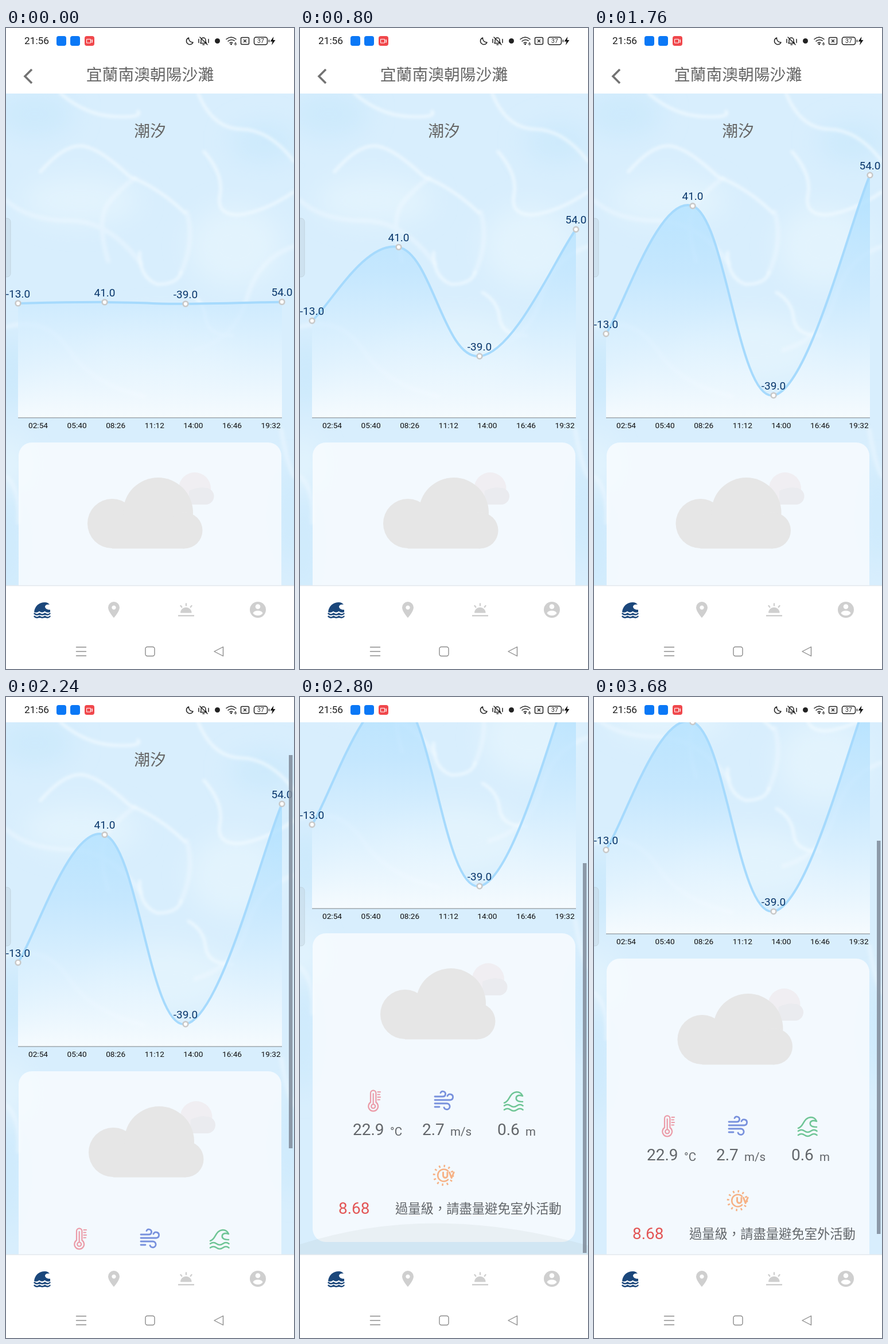
These frames come from a looping animation (502 by 1115 pixels, 3.76 s). An HTML page:

```html
<!DOCTYPE html>
<html lang="zh-Hant">
<head>
<meta charset="utf-8">
<title>潮汐</title>
<style>
html, body { margin: 0; width: 100%; height: 100%; overflow: hidden; background: #fff; }
svg { display: block; width: 100%; height: 100%; }
text { font-family: Roboto, "Noto Sans CJK TC", "Noto Sans CJK JP", "Noto Sans CJK", sans-serif; }
.mid { text-anchor: middle; }
.line { fill: none; stroke-linecap: round; stroke-linejoin: round; }
</style>
</head>
<body>
<svg viewBox="0 0 502 1115" preserveAspectRatio="none">
  <defs>
    <linearGradient id="fill" gradientUnits="userSpaceOnUse" x1="0" y1="215" x2="0" y2="678">
      <stop offset="0" stop-color="#a6deff" stop-opacity=".85"/>
      <stop offset=".45" stop-color="#bde4ff" stop-opacity=".7"/>
      <stop offset="1" stop-color="#fff" stop-opacity=".75"/>
    </linearGradient>
    <filter id="soft" x="-20%" y="-20%" width="140%" height="140%"><feGaussianBlur stdDeviation="2.5"/></filter>
    <filter id="haze" x="-50%" y="-50%" width="200%" height="200%"><feGaussianBlur stdDeviation="22"/></filter>
  </defs>

  <g id="page">
    <rect y="44" width="502" height="1300" fill="#d8eefd"/>
    <g filter="url(#haze)">
      <g fill="#c9e8fc" opacity=".7">
        <ellipse cx="50" cy="150" rx="70" ry="40"/><ellipse cx="10" cy="600" rx="50" ry="60"/>
        <ellipse cx="450" cy="200" rx="60" ry="35"/><ellipse cx="495" cy="850" rx="25" ry="90"/>
        <ellipse cx="5" cy="900" rx="25" ry="100"/>
      </g>
      <g fill="#eaf7fe" opacity=".6">
        <ellipse cx="130" cy="300" rx="100" ry="40"/><ellipse cx="400" cy="380" rx="80" ry="70"/>
        <ellipse cx="270" cy="560" rx="130" ry="60"/><ellipse cx="5" cy="760" rx="30" ry="50"/>
      </g>
    </g>
    <g class="line" stroke="#f3fbff" filter="url(#soft)">
      <g stroke-width="5" opacity=".75">
        <path d="M95 114Q140 152 190 154T230 145M60 250Q100 204 130 205T215 258Q270 280 312 322"/>
        <path d="M335 114Q360 175 410 176T502 232M345 215Q380 255 373 290T405 325Q450 320 502 285"/>
        <path d="M233 390Q232 435 265 446Q300 445 305 425M318 460Q345 475 348 505T395 535"/>
      </g>
      <g stroke-width="8" opacity=".4">
        <path d="M0 300Q40 335 110 335T235 410M178 405Q155 330 182 300T225 262M305 425Q330 370 315 320"/>
        <path d="M502 380Q440 400 420 470T330 560M0 520Q70 500 110 560T240 640M0 780Q25 800 22 860M480 700Q490 760 502 780"/>
      </g>
    </g>

    <rect y="44" width="502" height="70" fill="#fff"/>
    <path class="line" d="M45 72L33 84L45 96" stroke="#737373" stroke-width="3.6" style="stroke-linecap:butt;stroke-linejoin:miter"/>
    <g class="mid" font-size="27.8" fill="#666">
      <text x="251" y="91">宜蘭南澳朝陽沙灘</text>
      <text x="251" y="189">潮汐</text>
    </g>

    <path id="area" fill="url(#fill)"/>
    <path d="M21 678H481" stroke="#7c8286" stroke-width="1.2"/>
    <path id="curve" class="line" stroke="#a6dafd" stroke-width="4"/>
    <g id="points" class="mid" font-size="19" fill="#08366b"></g>
    <g id="hours" class="mid" font-size="13.7" fill="#111"></g>

    <rect x="22" y="721" width="458" height="537" rx="23" fill="#fbfdff" fill-opacity=".8"/>
    <g id="smallCloud">
      <circle cx="328" cy="801" r="28" fill="#f0eef2"/>
      <path d="M318 829V805Q336 797 347 800A14.5 14.5 0 0 1 347 829Z" fill="#eaebef"/>
    </g>
    <g id="bigCloud" fill="#e6e6e6">
      <circle cx="185" cy="862" r="43"/><circle cx="265" cy="843" r="61"/><circle cx="311" cy="874" r="31.5"/>
      <rect x="185" y="850" width="126" height="55.5"/>
    </g>

    <g class="line" stroke="#eb9ba8" stroke-width="2.2">
      <path d="M123 1015V999a4.7 4.7 0 0 1 9.4 0V1015a8.4 8.4 0 1 1-9.4 0ZM127.7 1000V1018M135.500 997H140M135.500 1001.500H139M135.500 1006H140M135.500 1010.500H139"/>
      <circle cx="127.700" cy="1022" r="3.500"/>
    </g>
    <path class="line" stroke="#7891dd" stroke-width="2.8" d="M235 1005H249A4.500 4.500 0 1 0 245 998.500M235 1011H262A5 5 0 1 0 257 1004M235 1017H256A5.200 5.200 0 1 1 251 1024M235 1023H243"/>
    <path class="line" stroke="#6fc596" stroke-width="2.6" d="M356 1016C366 1014 364 998 378 997Q385 997 388 1004Q380 1001 377 1006Q375 1014 388 1014M356 1021q5.500-4 11 0t11 0t10.500 0M356 1028q5.500-4 11 0t11 0t10.500 0"/>
    <g fill="none" stroke="#f6b286">
      <circle cx="250" cy="1142" r="16.300" stroke-width="4" stroke-dasharray="2.6 5.930"/>
      <path d="M258 1134.500A10.500 10.500 0 1 0 258 1149.500" stroke-width="2.600" stroke-linecap="round"/>
      <path class="line" d="M249.500 1137v5.500a3.700 3.700 0 0 0 7.400 0v-5.500M260.500 1137l3.600 9.500l4-9.500" stroke-width="3"/>
    </g>
    <g font-size="28" fill="#62666a">
      <text x="92" y="1072">22.9</text><text x="213" y="1072">2.7</text><text x="344" y="1072">0.6</text>
      <text x="67" y="1209" fill="#e35656">8.68</text>
      <g font-size="20.500">
        <text x="157" y="1073">°C</text><text x="262" y="1073">m/s</text><text x="393" y="1073">m</text>
      </g>
      <text x="166" y="1207.500" font-size="22.300">過量級，請盡量避免室外活動</text>
    </g>
  </g>

  <path id="glow" d="M0 952Q230 878 502 954V970H0Z" fill="#8a8f94" fill-opacity=".09"/>
  <rect id="bar" x="493" width="6.500" fill="#818d9b" fill-opacity=".87"/>
  <rect x="-10" y="331" width="18" height="102" rx="6" fill="#c6d8e3" fill-opacity=".5" stroke="#b9c9d3" stroke-opacity=".6"/>

  <!-- status bar -->
  <rect width="502" height="44" fill="#fff"/>
  <text x="32" y="28.300" font-size="17.300" fill="#1c1c1c">21:56</text>
  <rect x="88" y="14" width="17" height="17" rx="4" fill="#0b78f6"/>
  <rect x="112" y="14" width="17" height="17" rx="4" fill="#0b78f6"/>
  <rect x="137" y="14" width="17" height="17" rx="4" fill="#f0484c"/>
  <path class="line" d="M141 19.500h6.500v6.500H141ZM147.500 22l3-1.500v4.500l-3-1.500" stroke="#fff" stroke-width="1"/>
  <g class="line" stroke="#222" stroke-width="1.500">
    <path d="M318.500 17A6 6 0 1 0 326 25A7 7 0 0 1 318.500 17Z"/>
    <path d="M339 26.500H349.500L348 24V21a4 4 0 0 0-8 0v3ZM343 29h2.500M338 16L351 29M336 19.500v6M353 19.500v6"/>
    <path d="M384 19.500Q392.500 12.500 401 19.500M387 23Q392.500 18.500 398 22M390 26Q392.500 24 395 26"/>
    <rect x="409.500" y="16.500" width="14" height="12" rx="2"/>
    <path d="M414.500 20.500l4 4m0-4l-4 4"/>
    <rect x="432.500" y="16" width="23" height="13" rx="3.500"/>
    <path d="M458.500 21v3"/>
  </g>
  <circle cx="368.500" cy="22.500" r="4.500" fill="#222"/>
  <circle cx="392.500" cy="28" r="1.500" fill="#222"/>
  <text x="398" y="30" font-size="7" font-weight="700" fill="#222">6</text>
  <text class="mid" x="444" y="26.300" font-size="10.500" fill="#222">37</text>
  <path d="M466.500 15L460.500 23.500H464.500L463 30L469.500 21H465.500Z" fill="#111"/>

  <!-- bottom navigation -->
  <rect y="970" width="502" height="145" fill="#fff"/>
  <path d="M0 970H502" stroke="#e3e9ee" stroke-width="1.500"/>
  <g fill="#1b477b">
    <path d="M49 1016C50 1006 57 999 68 999Q73 999 76 1003C71 1002 68 1004 68 1007Q69 1012 77 1012V1016Q72 1018 67.500 1014.500Q63 1018.500 58 1014.500Q54 1018 49 1016Z"/>
    <path class="line" d="M49.500 1018.500q4.500 4 9 0q4.700 4 9.300 0q4.700 4 8.800 0M49.500 1023.500q4.500 4 9 0q4.700 4 9.300 0q4.700 4 8.800 0" stroke="#1b477b" stroke-width="2.400" style="fill:none"/>
  </g>
  <g fill="#cfcfcf">
    <path fill-rule="evenodd" d="M188 998a10 10 0 0 1 10 10C198 1015 188 1026 188 1026S178 1015 178 1008A10 10 0 0 1 188 998ZM188 1004.500a3.600 3.600 0 1 0 .010 0Z"/>
    <path d="M304 1017.500a9.800 9.800 0 0 1 19.600 0ZM300 1021h28v2.600h-28Z"/>
    <path class="line" d="M314 1001.500v3M304.500 1005l1.800 2.200M323.500 1005l-1.800 2.200" stroke="#cfcfcf" stroke-width="2.400"/>
    <circle cx="439" cy="1012" r="14"/>
    <circle cx="439" cy="1006.500" r="4.300" fill="#fff"/>
    <path d="M430.500 1018Q432 1013.500 439 1013.500T447.500 1018Q444.500 1022 439 1022T430.500 1018Z" fill="#fff"/>
  </g>
  <g class="line" stroke="#8c8c8c" stroke-width="1.400">
    <path d="M122.500 1077H139.500M122.500 1084.500H139.500M122.500 1092H139.500"/>
    <rect x="243" y="1076.500" width="16" height="16" rx="3.500"/>
    <path d="M378.500 1076.500V1092.500L363 1084.500Z"/>
  </g>
</svg>
<script>
const LOOP = 3760, STEP = 80;
const tides = [[21, -13], [172, 41], [313, -39], [481, 54]];
const hours = ['02:54', '05:40', '08:26', '11:12', '14:00', '16:46', '19:32'];

// Keyframes: [time, value], or [scroll, value] for the bar
const scrollKeys = [[1920, 0], [2080, 22], [2240, 70], [2400, 202], [2480, 252], [2560, 286], [2640, 303], [2720, 310], [3600, 310], [3680, 266]];
const bigKeys = [[0, 142], [240, 141], [720, 145.4], [800, 145], [1360, 140.3], [1680, 142.5], [1920, 142.5], [2080, 145], [2240, 144], [2400, 142.5], [2800, 140], [3360, 143.5], [3680, 145.5]];
const smallKeys = [[0, 363], [320, 362], [800, 365.5], [1200, 364], [1680, 367], [1920, 367], [2240, 365.5], [2400, 364], [2800, 362], [3280, 363], [3680, 365.5]];
const barFadeKeys = [[1920, 0], [2080, 1], [3120, 1], [3360, 0], [3600, 0], [3680, 1]];
const glowKeys = [[2560, 0], [2720, 1], [2800, 1], [3200, 0]];
const barTopKeys = [[0, 48], [70, 101], [202, 201], [266, 250], [310, 289]];

const $ = id => document.getElementById(id);
const set = (node, attrs) => { for (const k in attrs) node.setAttribute(k, attrs[k]); };

function make(parent, tag, attrs, text = '') {
  const node = document.createElementNS('http://www.w3.org/2000/svg', tag);
  set(node, attrs);
  node.textContent = text;
  return parent.appendChild(node);
}

function at(keys, t) {
  const i = keys.findIndex(k => k[0] > t);
  if (i < 0) return keys[keys.length - 1][1];
  if (i === 0) return keys[0][1];
  const [t0, a] = keys[i - 1], [t1, b] = keys[i];
  return a + (b - a) * (t - t0) / (t1 - t0);
}

hours.forEach((h, i) => make($('hours'), 'text', { x: 56 + i * 67.6, y: 696.3 }, h));
const marks = tides.map(([x, v]) => ({
  dot: make($('points'), 'circle', { cx: x, r: 4.4, fill: '#fff', stroke: '#c9c9c9', 'stroke-width': 2.6 }),
  label: make($('points'), 'text', { x }, v.toFixed(1)),
}));

// Cubic segments whose handles are a fifth of the neighbours' difference
function smoothPath(p) {
  const handle = (i, axis) =>
    0.2 * (p[Math.min(i + 1, p.length - 1)][axis] - p[Math.max(i - 1, 0)][axis]);
  return p.slice(1).reduce((d, [x, y], i) => {
    const [px, py] = p[i];
    return d + `C${px + handle(i, 0)} ${py + handle(i, 1)} ${x - handle(i + 1, 0)} ${y - handle(i + 1, 1)} ${x} ${y}`;
  }, `M${p[0]}`);
}

function drawChart(grow) {
  const points = tides.map(([x, v]) => [x, 478.4 - v * 4.12 * grow]);
  const d = smoothPath(points);
  set($('curve'), { d });
  set($('area'), { d: d + 'V678H21Z' });
  points.forEach(([, y], i) => {
    set(marks[i].dot, { cy: y });
    set(marks[i].label, { y: y - 10 });
  });
}

function draw(t) {
  const scroll = at(scrollKeys, t), top = at(barTopKeys, scroll);
  drawChart(Math.min(1, 0.009 + t / 1411));
  set($('page'), { transform: `translate(0 ${-scroll})` });
  set($('bigCloud'), { transform: `translate(${at(bigKeys, t) - 142} 0)` });
  set($('smallCloud'), { transform: `translate(${at(smallKeys, t) - 362} 0)` });
  set($('bar'), { y: top, height: Math.min(684, 967 - top), opacity: at(barFadeKeys, t) });
  set($('glow'), { opacity: at(glowKeys, t) });
}

const start = performance.now();
function tick() {
  const t = (performance.now() - start) % LOOP;
  draw(Math.floor(t / STEP) * STEP);
  requestAnimationFrame(tick);
}
tick();
</script>
</body>
</html>
```
